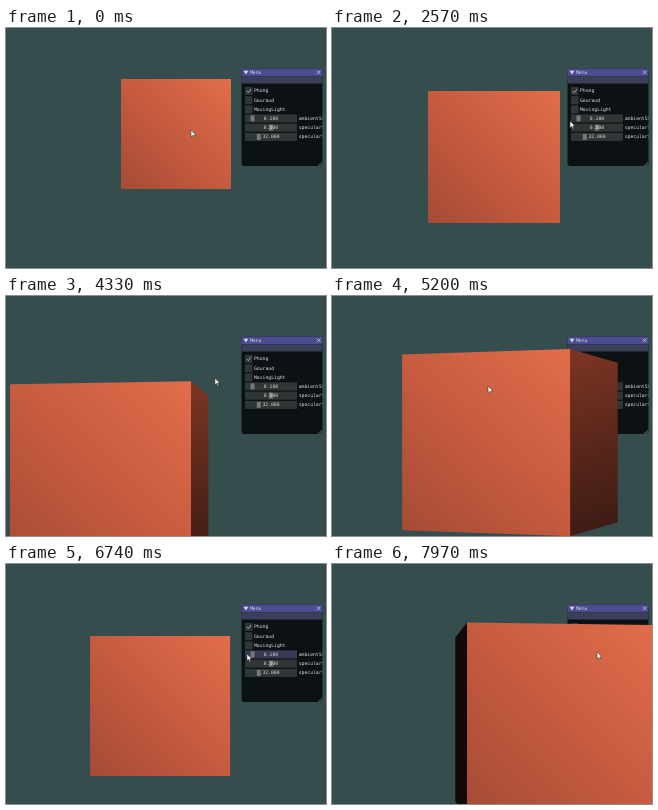
An HTML page with a canvas that plays this animation: 320 px wide and 240 px high, repeating every 8000 ms.

```html
<!DOCTYPE html>
<html lang="en">
<head>
<meta charset="utf-8">
<title>Lit cube</title>
<style>
  html, body { margin: 0; width: 100%; height: 100%; overflow: hidden; background: #364d4d; }
  canvas { display: block; width: 320px; height: 240px; }
</style>
</head>
<body>
<canvas id="stage" width="320" height="240"></canvas>
<script>
const ctx = document.getElementById('stage').getContext('2d');
const LOOP = 8000;
const DIST = 6;

// time, front face left, front face right, centre y, turn in degrees
const cubeKeys = [
  [0, 115, 225, 106, 0],
  [730, 115, 225, 106, 0],
  [1530, 109, 221, 105, 0],
  [2330, 100, 226, 116, 0],
  [2570, 96, 228, 129, 0],
  [3170, 79, 231, 139, 0],
  [4000, 36, 206, 160, 5],
  [4330, 4, 185, 179, 10.5],
  [4480, 0, 182, 180, 12],
  [4870, 24, 200, 165, 17],
  [5200, 70, 238, 146.5, 20.5],
  [5600, 120, 283, 142, 17],
  [5970, 108, 264, 149, 8.3],
  [6540, 93, 235, 144, 3],
  [6740, 84, 224, 142, 0],
  [7370, 121, 273, 143, -5],
  [7970, 135, 324, 155.5, -8.5]
];

// time, tip x, tip y
const cursorKeys = [
  [0, 185, 102], [100, 185, 102], [430, 238, 95], [2570, 238, 93],
  [3170, 238, 91], [4000, 236, 87], [4330, 209, 82], [4870, 176, 86],
  [5200, 156, 90], [5600, 175, 90], [5970, 202, 89], [6740, 241, 90],
  [7370, 250, 89], [7970, 265, 88]
];

function sample(keys, t) {
  const i = keys.findIndex(k => k[0] > t);
  if (i < 0) return keys[keys.length - 1].slice(1);
  const a = keys[i - 1], b = keys[i];
  const p = (t - a[0]) / (b[0] - a[0]);
  return a.slice(1).map((v, j) => v + (b[j + 1] - v) * p);
}

function rect(x, y, w, h, fill) {
  ctx.fillStyle = fill;
  ctx.fillRect(x, y, w, h);
}

function poly(points, fill) {
  ctx.beginPath();
  points.forEach(([x, y]) => ctx.lineTo(x, y));
  ctx.closePath();
  ctx.fillStyle = fill;
  ctx.fill();
}

function stroke(points, color, width) {
  ctx.beginPath();
  points.forEach(([x, y]) => ctx.lineTo(x, y));
  ctx.strokeStyle = color;
  ctx.lineWidth = width;
  ctx.stroke();
}

function gradient(x0, y0, x1, y1, ...colors) {
  const g = ctx.createLinearGradient(x0, y0, x1, y1);
  colors.forEach((c, i) => g.addColorStop(i / (colors.length - 1), c));
  return g;
}

function label(text, x, y) {
  ctx.fillStyle = '#dedede';
  ctx.fillText(text, x, y);
}

function drawMenu(mx, my) {
  ctx.save();
  ctx.beginPath();
  ctx.roundRect(235.5, 40.5, 81, 97.5, 3);
  ctx.clip();
  rect(235, 40, 82, 99, '#0c1213');
  rect(235, 40, 82, 8.5, '#4b4c92');
  rect(235, 48.5, 82, 7, '#3b3f57');

  ctx.font = '4.75px "DejaVu Sans Mono", monospace';
  ctx.textBaseline = 'middle';
  poly([[237.7, 42.7], [242.3, 42.7], [240, 46.5]], '#e0e0e0');
  label('Menu', 244, 44.7);
  stroke([[310.8, 42.5], [314.4, 46.1]], '#d4d4dc', 0.8);
  stroke([[314.4, 42.5], [310.8, 46.1]], '#d4d4dc', 0.8);

  ['Phong', 'Gouraud', 'MovingLight'].forEach((name, i) => {
    const y = 63 + i * 9.2;
    rect(239, y - 4, 7.5, 8, '#303536');
    label(name, 248, y + 0.2);
  });
  stroke([[240.8, 63], [242.3, 64.8], [245, 61]], '#a0a0a0', 1);

  [['0.100', 'ambientStrength', 244.5], ['0.500', 'specularStrength', 263],
   ['32.000', 'specularShininess', 250.8]].forEach(([value, name, grab], i) => {
    const y = 90.4 + i * 9.25;
    const over = mx >= 239 && mx <= 291 && Math.abs(my - y) < 4;
    rect(239, y - 4, 52, 8, over ? '#373a55' : '#303536');
    rect(grab, y - 3, 4, 6, '#777a7a');
    ctx.textAlign = 'center';
    label(value, 265, y + 0.2);
    ctx.textAlign = 'left';
    label(name, 292.7, y + 0.2);
  });
  poly([[317, 132.5], [317, 138], [311, 138]], '#3a4041');
  ctx.restore();
}

function drawCube([xl, xr, cy, deg]) {
  const s = Math.sin(deg * Math.PI / 180), c = Math.cos(deg * Math.PI / 180);
  const view = (x, z) => {
    const k = 1 / (DIST - x * s + z * c);
    return { u: (x * c + z * s) * k, k };
  };
  const left = view(-0.5, -0.5), right = view(0.5, -0.5);
  const size = (xr - xl) / (right.u - left.u);
  const edge = v => {
    const x = xl + (v.u - left.u) * size, h = v.k * size / 2;
    return { x, top: cy - h, bottom: cy + h };
  };
  const face = (a, b, fill) =>
    poly([[a.x, a.top], [b.x, b.top], [b.x, b.bottom], [a.x, a.bottom]], fill);

  const l = edge(left), r = edge(right);
  const backL = edge(view(-0.5, 0.5)), backR = edge(view(0.5, 0.5));
  if (backR.x > r.x) {
    face(r, backR, gradient(r.x, r.top, backR.x, r.bottom, '#7c3524', '#5a271b', '#3b1a13'));
  }
  if (backL.x < l.x) face(backL, l, '#120a09');
  face(l, r, gradient(r.x, r.top, l.x, r.bottom, '#e26d4b', '#c65b3f', '#a54b35'));
}

function drawCursor(x, y) {
  const shape = [[0, 0], [0, 6.8], [1.6, 5.4], [2.6, 7.7], [3.7, 7.2], [2.7, 5], [4.7, 4.8]]
    .map(([dx, dy]) => [x + dx, y + dy]);
  poly(shape, '#fff');
  stroke([...shape, shape[0]], '#222', 0.5);
}

function draw(now) {
  const t = now % LOOP;
  const [mx, my] = sample(cursorKeys, t);
  rect(0, 0, 320, 240, '#364d4d');
  drawMenu(mx, my);
  drawCube(sample(cubeKeys, t));
  drawCursor(mx, my);
}

const start = performance.now();
function tick() {
  draw(performance.now() - start);
  requestAnimationFrame(tick);
}
tick();
</script>
</body>
</html>
```
